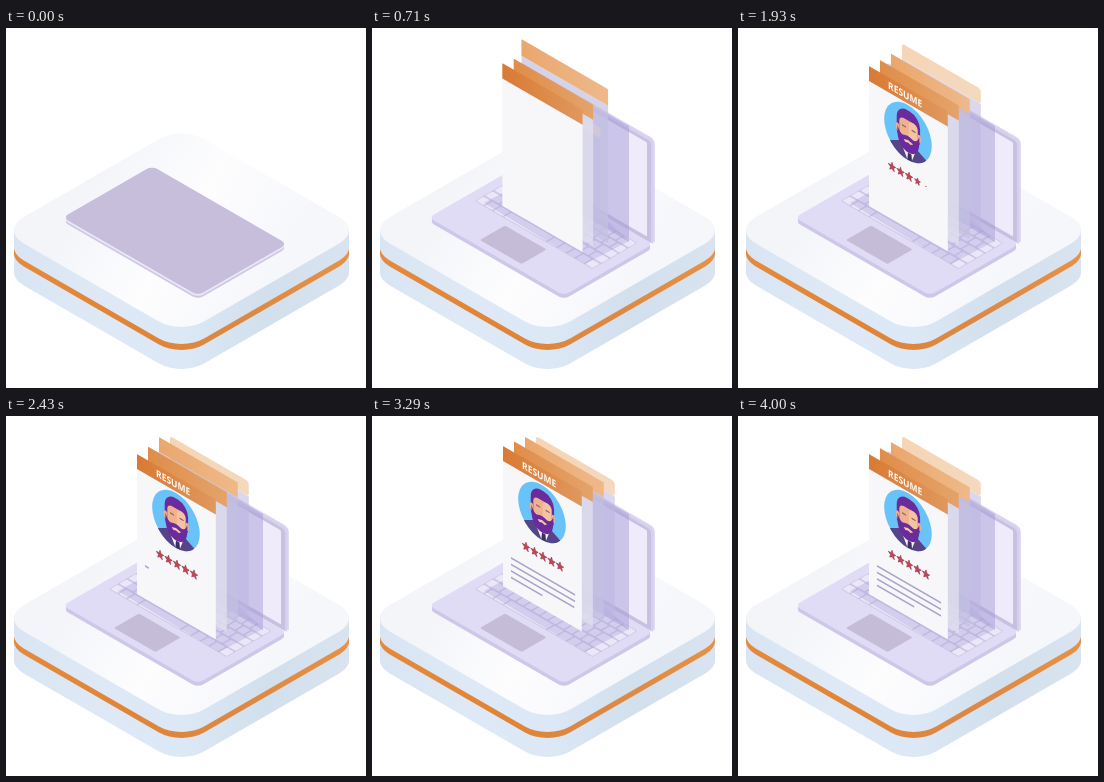
Write an HTML page with a canvas that moves like this. It is 360x360 px and loops after 4780 ms.

```html
<!DOCTYPE html>
<html lang="en">
<head>
<meta charset="utf-8">
<title>Resume on a laptop</title>
<style>
html, body { margin: 0; width: 100%; height: 100%; overflow: hidden; background: #fff; }
canvas { display: block; width: 360px; height: 360px; }
</style>
</head>
<body>
<canvas id="stage"></canvas>
<script>
const LOOP = 4780, FPS = 14, LAST_STEP = 56;
const COS = Math.sqrt(3) / 2;
const BASE = { x: 146, y: 138, w: 156, d: 103 };
const DOC = { w: 91, h: 140, head: 15 };

const canvas = document.getElementById('stage');
const ratio = window.devicePixelRatio || 1;
canvas.width = canvas.height = 360 * ratio;
const ctx = canvas.getContext('2d');

const clamp = x => Math.max(0, Math.min(1, x));
const progress = (t, start, length) => clamp((t - start) / length);
const easeOut = x => 1 - (1 - x) ** 2;
const easeInOut = x => (1 - Math.cos(Math.PI * x)) / 2;
const easeBack = x => 1 + 2.7 * (x - 1) ** 3 + 1.7 * (x - 1) ** 2;

// A raised cosine: 0 at centre - half, 1 at centre, 0 at centre + half.
const bump = (t, centre, half) =>
  Math.abs(t - centre) < half ? Math.cos(Math.PI / 2 * (t - centre) / half) ** 2 : 0;

function gradient(x0, y0, x1, y1, ...colors) {
  const g = ctx.createLinearGradient(x0, y0, x1, y1);
  colors.forEach((c, i) => g.addColorStop(i / (colors.length - 1), c));
  return g;
}

function box(x, y, w, h, r, fill) {
  ctx.beginPath();
  ctx.roundRect(x, y, w, h, r);
  ctx.fillStyle = fill;
  ctx.fill();
}

function ellipse(x, y, rx, ry, fill) {
  ctx.beginPath();
  ctx.ellipse(x, y, rx, ry, 0, 0, Math.PI * 2);
  ctx.fillStyle = fill;
  ctx.fill();
}

function poly(points, fill) {
  ctx.beginPath();
  points.forEach(([x, y]) => ctx.lineTo(x, y));
  ctx.closePath();
  ctx.fillStyle = fill;
  ctx.fill();
}

function within(matrix, draw) {
  ctx.save();
  ctx.transform(...matrix);
  draw();
  ctx.restore();
}

const floor = (x, y, draw) => within([COS, 0.5, -COS, 0.5, x, y], draw);

function drawPlatform() {
  const side = 208.6, r = 26;
  const slab = (y, fill) => {
    ctx.save();
    floor(175.5, 98 + y, () => {
      ctx.beginPath();
      ctx.roundRect(0, 0, side, side, r);
    });
    ctx.fillStyle = fill;
    ctx.fill();
    ctx.restore();
  };
  const wall = gradient(8, 0, 343, 0, '#d9e5f3', '#dfe9f6', '#dce8f6', '#d2dfec', '#d9e4f0');
  const band = gradient(8, 0, 343, 0, '#e58a3c', '#e08436', '#dc8844', '#e69145');
  for (let y = 42; y > 0; y--) slab(y, y > 23 || y <= 17 ? wall : band);
  slab(0, gradient(90, 150, 260, 255, '#f3f5f9', '#fdfdfe', '#f6f7fb'));
}

function drawKeyboard() {
  const left = 10, top = 8, rows = 5, pitch = 10.4;
  box(left, top, 136, 52, 2, '#cdc6e3');
  const key = (x, row, w) =>
    box(left + x + 0.8, top + row * pitch + 0.9, w - 1.6, pitch - 1.9, 1.2, '#ebe7f9');
  for (let row = 0; row < rows - 1; row++) {
    const first = 8 + row * 3;
    key(0, row, first);
    const count = 12 - (row > 1 ? 1 : 0);
    const w = 9.4;
    for (let i = 0; i < count; i++) key(first + i * w, row, w);
    const end = first + count * w;
    key(end, row, 136 - end);
  }
  [0, 10, 20, 32, 82, 94, 105, 115, 126].forEach((x, i, all) =>
    key(x, rows - 1, (all[i + 1] || 136) - x));
}

function drawLaptop(t) {
  const { x, y, w, d } = BASE;
  const angle = Math.PI / 2 * easeInOut(progress(t, 0, 400));
  const inside = angle > Math.PI / 4;
  for (let h = 4; h > 0; h--) {
    floor(x, y + h, () => box(0, 0, w, d, 6, angle ? '#cec7e9' : h > 2 ? '#cfc8e3' : '#ebe8f8'));
  }
  floor(x, y, () => {
    box(0, 0, w, d, 6, '#e1dcf5');
    drawKeyboard();
    box(52, 67, 48, 29, 1.5, '#c5bcd8');
  });

  const c = Math.cos(angle), s = Math.sin(angle);
  const lid = (dx, dy, draw) =>
    within([COS, 0.5, -COS * c, 0.5 * c - s, x + dx, y + dy], draw);
  if (!inside) {
    lid(0, 0, () => box(0, 0, w, d, 6, '#c6bedb'));
    return;
  }
  lid(1.7, -1.5, () => box(0, 0, w, d, [0, 0, 5, 5], '#dad4f1'));
  lid(0, 0, () => {
    box(0, 0, w, d, [0, 0, 5, 5], '#d6cfed');
    box(1.5, 0, w - 4, d - 2, [0, 0, 4, 4], '#c8c0df');
    box(6, 4, 143, 94, 1, '#efebfb');
  });
}

function drawShadow(t) {
  ctx.save();
  ctx.globalAlpha = progress(t, 440, 240);
  poly([[112, 175], [178, 139], [257, 213], [213, 236]], 'rgba(166,157,216,.36)');
  poly([[178, 53], [257, 98], [257, 214], [178, 168]], 'rgba(160,151,211,.46)');
  ctx.restore();
}

function drawAvatar(t) {
  const pop = easeOut(progress(t, 830, 320));
  if (!pop) return;
  const rise = 1 - easeOut(progress(t, 980, 350));
  const coat = 1 - easeOut(progress(t, 1280, 420));
  const skin = '#eeb28f', hair = '#6b2b9c';
  ctx.save();
  ctx.translate(45, 44);
  ctx.scale(pop, pop);
  ellipse(0, 0, 27.5, 27.5, '#69c3f8');
  ctx.clip();
  ctx.translate(0, rise * 50);

  poly([[-9, 13], [10, 13], [13, 30], [-12, 30]], '#f6f5fa');
  ctx.save();
  ctx.translate(0, coat * 16);
  poly([[-9, 12], [-21, 18], [-27, 30], [1, 30]], '#574389');
  poly([[10, 12], [22, 18], [28, 30], [3, 30]], '#574389');
  poly([[0, 20], [4, 20], [5, 30], [-1, 30]], '#3b315f');
  ctx.restore();

  box(-13, -22, 27, 30, [12, 12, 5, 5], hair);
  ellipse(-12, 0, 2, 4, skin);
  ellipse(13, 0, 2, 4, skin);
  box(-10, -12, 21, 26, [5, 5, 9, 9], skin);
  box(1, -12, 10, 20, [4, 5, 4, 2], '#f5c3a2');
  ctx.beginPath();
  ctx.moveTo(-12, -2);
  ctx.quadraticCurveTo(-10, 5, -6, 5);
  ctx.quadraticCurveTo(0, 2, 6, 5);
  ctx.quadraticCurveTo(11, 5, 13, -2);
  ctx.quadraticCurveTo(15, 19, 0.5, 20);
  ctx.quadraticCurveTo(-14, 19, -12, -2);
  ctx.fillStyle = hair;
  ctx.fill();
  poly([[-5, 9], [0, 7.5], [6, 9], [3, 11], [0, 10], [-3, 11]], '#f3c7b2');
  box(-7, -5, 5, 1.4, 0.7, '#9a5f68');
  box(4, -5, 5, 1.4, 0.7, '#9a5f68');
  ctx.restore();
}

function drawStar(x, y, r) {
  ctx.beginPath();
  for (let i = 0; i < 10; i++) {
    const a = i * Math.PI / 5 - Math.PI / 2, q = i % 2 ? r * 0.43 : r;
    ctx.lineTo(x + q * Math.cos(a), y + q * Math.sin(a));
  }
  ctx.closePath();
  ctx.fillStyle = '#cb4348';
  ctx.strokeStyle = '#96365b';
  ctx.lineWidth = 0.6;
  ctx.fill();
  ctx.stroke();
}

function drawContent(t) {
  ctx.save();
  ctx.beginPath();
  ctx.rect(21, 0, 44 * progress(t, 1200, 600), DOC.head);
  ctx.clip();
  ctx.font = '700 9.8px "Open Sans", sans-serif';
  ctx.fillStyle = '#fff8f0';
  ctx.fillText('RESUME', 22, 11.2);
  ctx.restore();

  drawAvatar(t);

  for (let i = 0; i < 5; i++) {
    const size = easeOut(progress(t, 1400 + i * 130, 260));
    if (size) drawStar(26.6 + i * 9.8, 87.5, 4.5 * size);
  }

  ctx.strokeStyle = '#aaa2cb';
  ctx.lineWidth = 1.8;
  for (let i = 0; i < 4; i++) {
    const grown = easeOut(progress(t, 2410 + i * 170, 600));
    if (!grown) continue;
    ctx.beginPath();
    ctx.moveTo(9.2, 107.2 + i * 6.5);
    ctx.lineTo(9.2 + (i < 3 ? 74 : 43) * grown, 107.2 + i * 6.5);
    ctx.stroke();
  }
}

// Front to back.
const sheets = [
  { start: 405, lift: [3300, 650, 8], body: '#f7f7f9', head: ['#d97a34', '#e0985d'] },
  { start: 392, lift: [3050, 850, 8], body: 'rgba(224,224,239,.78)', head: ['#e08d49', '#e4a36a'] },
  { start: 507, lift: [2860, 1100, 7.5], body: 'rgba(196,192,226,.7)', head: ['#eaa76d', '#eeb98a'] },
  { start: 650, lift: [1500, 900, 8.5], body: 'rgba(190,182,224,.55)', head: ['#f5d5b5', '#f4d9be'] }
];

function drawSheet(sheet, index, t) {
  if (t <= sheet.start) return;
  const scale = easeBack(progress(t, sheet.start, 350));
  const [centre, half, height] = sheet.lift;
  const x = 131 + 11 * index;
  const y = 38 - 6 * index - height * bump(t, centre, half);
  const px = 36, py = 149;
  ctx.save();
  ctx.translate(x + px, y + py);
  ctx.scale(scale, scale);
  ctx.translate(-px, -py);
  within([COS, 0.5, 0, 1, 0, 0], () => {
    const r = index === 3 ? 3 : 0.8;
    box(0, DOC.head, DOC.w, DOC.h - DOC.head, [0, 0, r, r], sheet.body);
    box(0, 0, DOC.w, DOC.head, [r, r, index === 3 ? r : 0, 0], gradient(0, 0, DOC.w, 0, ...sheet.head));
    if (index === 0) drawContent(t);
  });
  ctx.restore();
}

function render(t) {
  ctx.setTransform(ratio, 0, 0, ratio, 0, 0);
  ctx.fillStyle = '#fff';
  ctx.fillRect(0, 0, 360, 360);
  drawPlatform();
  drawLaptop(t);
  drawShadow(t);
  for (let i = sheets.length - 1; i >= 0; i--) drawSheet(sheets[i], i, t);
}

const origin = performance.now();
function tick() {
  const t = (performance.now() - origin) % LOOP;
  const step = Math.min(LAST_STEP, Math.floor((t + 5) * FPS / 1000));
  render(step * 1000 / FPS);
  requestAnimationFrame(tick);
}
tick();
</script>
</body>
</html>
```
